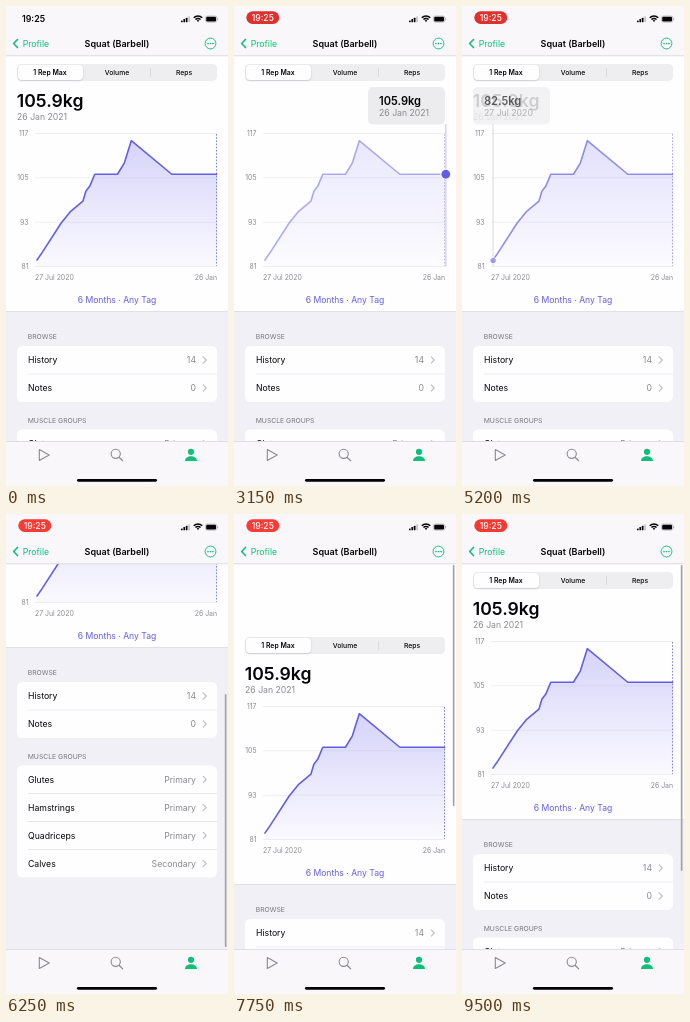
Recreate the animation shown at these times as an HTML page with a canvas. Size 222 by 480 pixels, loop 9.55 s.

```html
<!DOCTYPE html>
<html lang="en">
<head>
<meta charset="utf-8">
<title>Squat (Barbell)</title>
<style>
html, body { margin: 0; width: 100%; height: 100%; overflow: hidden; background: #fff; }
canvas { display: block; width: 222px; height: 480px; }
</style>
</head>
<body>
<canvas id="stage"></canvas>
<script>
const W = 222, H = 480, LOOP = 9550, STEP = 50;
const GREEN = '#0dc078', PURPLE = '#625fe4', GRAY = '#8a8a8e', BLACK = '#050505';
const PAPER = '#fefdff', BAR = '#f9f7fa';
const canvas = document.getElementById('stage');
const c = canvas.getContext('2d');
const dpr = window.devicePixelRatio || 1;
canvas.width = W * dpr;
canvas.height = H * dpr;

// Day since the first entry, kilograms
const entries = [
  [0, 82.5], [4, 84], [25, 92.7], [34, 95.7], [47, 98.6], [50, 101.3], [54, 102.7],
  [59, 105.9], [82, 105.9], [89, 109], [96, 115], [137, 105.9], [183, 105.9]
].map(([day, kg]) => ({ day, kg, x: 30.5 + day * 180.7 / 183, y: 127.3 + (117 - kg) * 3.69 }));
entries[3].kg = 95.6;

// Time, finger position in days
const fingerPath = [[1780, 96], [2300, 96], [2900, 140], [3300, 183], [3550, 183],
  [4150, 34], [4450, 34], [4700, 0], [4950, 0]];
// Time, scroll offset
const scrollPath = [[6000, 0], [6230, 172], [6350, 172], [6800, -71], [7000, -71],
  [7700, -65], [8100, -65]];
const MAX_SCROLL = 119;

const clamp = (v, lo = 0, hi = 1) => Math.min(hi, Math.max(lo, v));
const ramp = (t, start, length) => clamp((t - start) / length);
const smooth = u => u * u * (3 - 2 * u);

function follow(path, t) {
  if (t <= path[0][0]) return path[0][1];
  for (let i = 1; i < path.length; i++) {
    const [t0, a] = path[i - 1], [t1, b] = path[i];
    if (t <= t1) return a + (b - a) * smooth((t - t0) / (t1 - t0));
  }
  return path[path.length - 1][1];
}

function scrollAt(t) {
  if (t < 8100) return follow(scrollPath, t);
  const u = (t - 8100) / 90;
  const s = -65 * (1 + u) * Math.exp(-u);
  return Math.abs(s) < 0.3 ? 0 : s;
}

function text(str, x, y, size, color, { weight = 400, align = 'left' } = {}) {
  c.font = `${weight} ${size}px Inter, "Liberation Sans", sans-serif`;
  c.textAlign = align;
  c.fillStyle = color;
  c.fillText(str, x, y);
}

function rect(x, y, w, h, color) {
  c.fillStyle = color;
  c.fillRect(x, y, w, h);
}

function round(x, y, w, h, r, color) {
  c.beginPath();
  c.roundRect(x, y, w, h, r);
  c.fillStyle = color;
  c.fill();
}

function disc(x, y, r, color) {
  c.beginPath();
  c.arc(x, y, r, 0, Math.PI * 2);
  c.fillStyle = color;
  c.fill();
}

function ring(x, y, r, color, width = 1) {
  c.beginPath();
  c.arc(x, y, r, 0, Math.PI * 2);
  c.strokeStyle = color;
  c.lineWidth = width;
  c.stroke();
}

function line(points, color, width = 1) {
  c.beginPath();
  points.forEach(([x, y]) => c.lineTo(x, y));
  c.strokeStyle = color;
  c.lineWidth = width;
  c.stroke();
}

function faded(alpha, draw) {
  if (alpha <= 0) return;
  c.save();
  c.globalAlpha *= alpha;
  draw();
  c.restore();
}

function chevron(x, y, w, h, color, width) {
  line([[x, y - h], [x + w, y], [x, y + h]], color, width);
}

function segments() {
  round(11, 58, 200, 17, 4.5, '#eeedef');
  c.save();
  c.shadowColor = 'rgba(0,0,0,.18)';
  c.shadowBlur = 2 * dpr;
  c.shadowOffsetY = 0.8 * dpr;
  round(12, 59, 65, 15, 4, PAPER);
  c.restore();
  rect(144, 62, 0.7, 9, '#d2d2d5');
  text('1 Rep Max', 44, 69, 6.9, BLACK, { weight: 600, align: 'center' });
  text('Volume', 111, 69, 6.8, BLACK, { weight: 500, align: 'center' });
  text('Reps', 178, 69, 6.8, BLACK, { weight: 500, align: 'center' });
}

function chart(press) {
  [117, 105, 93, 81].forEach((kg, i) => {
    const y = 127.5 + i * 44.3;
    rect(29, y - 0.3, 182, 0.7, '#e9e9eb');
    text(kg, 22.5, y + 2.4, 6.9, GRAY, { align: 'right' });
  });
  text('27 Jul 2020', 29, 274, 6.9, GRAY);
  text('26 Jan', 211, 274, 6.9, GRAY, { align: 'right' });

  faded(1 - press * 0.5, () => {
    const fill = c.createLinearGradient(0, 134, 0, 261);
    fill.addColorStop(0, 'rgba(95,92,235,.26)');
    fill.addColorStop(1, 'rgba(95,92,235,.02)');
    c.beginPath();
    c.moveTo(30.5, 260.5);
    entries.forEach(p => c.lineTo(p.x, p.y));
    c.lineTo(211.2, 260.5);
    c.fillStyle = fill;
    c.fill();
    c.setLineDash([1.6, 1.6]);
    line([[210.5, 128], [210.5, 260]], '#8482e8', 1);
    c.setLineDash([]);
    line(entries.map(p => [p.x, p.y]), PURPLE, 1.6);
  });
}

function dateLabel(day) {
  const date = new Date(Date.UTC(2020, 6, 27 + day));
  const month = 'JanFebMarAprMayJunJulAugSepOctNovDec'.substr(date.getUTCMonth() * 3, 3);
  return `${date.getUTCDate()} ${month} ${date.getUTCFullYear()}`;
}

function marker(t, press) {
  const day = follow(fingerPath, t);
  const p = entries.reduce((a, b) => Math.abs(b.day - day) < Math.abs(a.day - day) ? b : a);
  const x = p.x + 0.6;
  const left = clamp(x - 38, 11, 134);
  faded(press, () => {
    rect(x - 0.8, 118, 1.6, 142.5, '#dadade');
    disc(x, p.y, 5.4 * press, PAPER);
    disc(x, p.y, 4.4 * press, PURPLE);
    round(left, 81, 77, 37.5, 5, '#ecebee');
    text(p.kg.toFixed(1) + 'kg', left + 11, 99, 11.1, BLACK, { weight: 600 });
    text(dateLabel(p.day), left + 11, 110, 8.7, GRAY);
  });
}

function card(top, rows) {
  round(11, top, 200, rows.length * 28, 5.5, PAPER);
  rows.forEach(([label, value], i) => {
    const y = top + 14 + i * 28;
    if (i) rect(22, y - 14.3, 189, 0.6, '#dcdce0');
    text(label, 22, y + 3.2, 8.7, BLACK);
    text(value, 190, y + 3.2, 8.7, GRAY, { align: 'right' });
    chevron(197, y, 3.2, 3.3, '#c0c0c4', 1.2);
  });
}

function page(t, press) {
  segments();
  faded(1 - press, () => {
    text('105.9kg', 10.8, 101, 17.6, BLACK, { weight: 600 });
    text('26 Jan 2021', 11, 114, 8.7, GRAY);
  });
  chart(press);
  marker(t, press);
  text('6 Months · Any Tag', 111, 297, 8.6, PURPLE, { align: 'center' });
  rect(0, 305, W, 600, '#f1f0f6');
  rect(0, 305, W, 0.6, '#d6d6da');
  text('BROWSE', 21.7, 333.3, 6.8, '#77777c');
  card(340, [['History', '14'], ['Notes', '0']]);
  text('MUSCLE GROUPS', 21.7, 417, 6.8, '#77777c');
  card(423.5, [['Glutes', 'Primary'], ['Hamstrings', 'Primary'],
    ['Quadriceps', 'Primary'], ['Calves', 'Secondary']]);
}

function scrollbar(t, scroll) {
  const over = Math.max(-scroll, scroll - MAX_SCROLL, 0);
  const length = 306 - over;
  const top = scroll > MAX_SCROLL ? 433 - length : 51 + clamp(scroll / MAX_SCROLL) * 76;
  faded(ramp(t, 6000, 100), () => round(218.8, top, 1.7, length, 0.9, '#a3a3a7'));
}

// The recording badge darkens briefly every two seconds
function badgeColor(t) {
  const dim = (0.5 + 0.5 * Math.cos(Math.PI * (t - 950) / 1000)) ** 2;
  return `rgb(${251 - 38 * dim}, ${59 - 12 * dim}, ${53 - 10 * dim})`;
}

function statusBar(t) {
  const pill = ramp(t, 200, 250);
  faded(1 - pill, () => text('19:25', 16, 16.2, 8.8, BLACK, { weight: 600 }));
  faded(pill, () => {
    round(12.3, 5.3, 33, 12.6, 6.3, badgeColor(t));
    const clock = ramp(t, 2500, 250);
    faded(1 - clock, () => {
      ring(28.7, 11.5, 3.6, '#fff', 0.9);
      disc(28.7, 11.5, 2.1, '#fff');
    });
    faded(clock, () => text('19:25', 28.8, 14.7, 8.6, '#fff', { weight: 500, align: 'center' }));
  });
  for (let i = 0; i < 4; i++) {
    const h = 1.8 + i * 1.4;
    round(175 + i * 2.4, 16.3 - h, 1.7, h, 0.5, i < 3 ? BLACK : '#c4c4c6');
  }
  [1.2, 3.6, 6].forEach(r => {
    c.beginPath();
    c.arc(192, 16, r, -Math.PI * 0.75, -Math.PI * 0.25);
    c.strokeStyle = BLACK;
    c.lineWidth = 1.5;
    c.stroke();
  });
  c.beginPath();
  c.roundRect(199.4, 10, 11.4, 6.2, 1.9);
  c.strokeStyle = '#9c9c9e';
  c.lineWidth = 0.6;
  c.stroke();
  round(200.2, 10.8, 9.8, 4.6, 1.2, BLACK);
  rect(211.4, 12, 0.7, 2.2, '#9c9c9e');
}

function navBar(t) {
  rect(0, 0, W, 50, BAR);
  rect(0, 49.5, W, 0.7, '#cfcfd2');
  statusBar(t);
  line([[12, 33], [7.6, 37.5], [12, 42]], GREEN, 1.6);
  text('Profile', 16.7, 40.7, 8.7, GREEN);
  text('Squat (Barbell)', 111, 40.7, 9, BLACK, { weight: 600, align: 'center' });
  ring(204.5, 37.5, 5.4, GREEN, 0.95);
  [-2.5, 0, 2.5].forEach(dx => disc(204.5 + dx, 37.5, 0.85, GREEN));
}

function tabBar() {
  rect(0, 435, W, 45, BAR);
  rect(0, 435, W, 0.6, '#cfcfd2');
  c.lineJoin = 'round';
  c.beginPath();
  c.moveTo(33.3, 443.6);
  c.lineTo(43.2, 449);
  c.lineTo(33.3, 454.4);
  c.closePath();
  c.strokeStyle = GRAY;
  c.lineWidth = 1.1;
  c.stroke();
  ring(109.7, 447.8, 4.6, GRAY, 1.1);
  line([[113, 451.2], [117, 455.1]], GRAY, 1.3);
  disc(185, 445.8, 3.1, GREEN);
  c.beginPath();
  c.moveTo(179, 455);
  c.bezierCurveTo(179, 448.6, 191, 448.6, 191, 455);
  c.closePath();
  c.fillStyle = GREEN;
  c.fill();
  round(71, 473, 80, 2.7, 1.35, '#000');
}

function draw(t) {
  const press = ramp(t, 1780, 260) * (1 - ramp(t, 5100, 260));
  const scroll = scrollAt(t);
  c.setTransform(dpr, 0, 0, dpr, 0, 0);
  c.lineCap = 'butt';
  c.lineJoin = 'round';
  rect(0, 0, W, H, PAPER);
  c.save();
  c.translate(0, -scroll);
  page(t, press);
  c.restore();
  scrollbar(t, scroll);
  navBar(t);
  tabBar();
}

const start = performance.now();
function tick() {
  const t = (performance.now() - start) % LOOP;
  draw(Math.floor(t / STEP) * STEP);
  requestAnimationFrame(tick);
}
tick();
</script>
</body>
</html>
```
